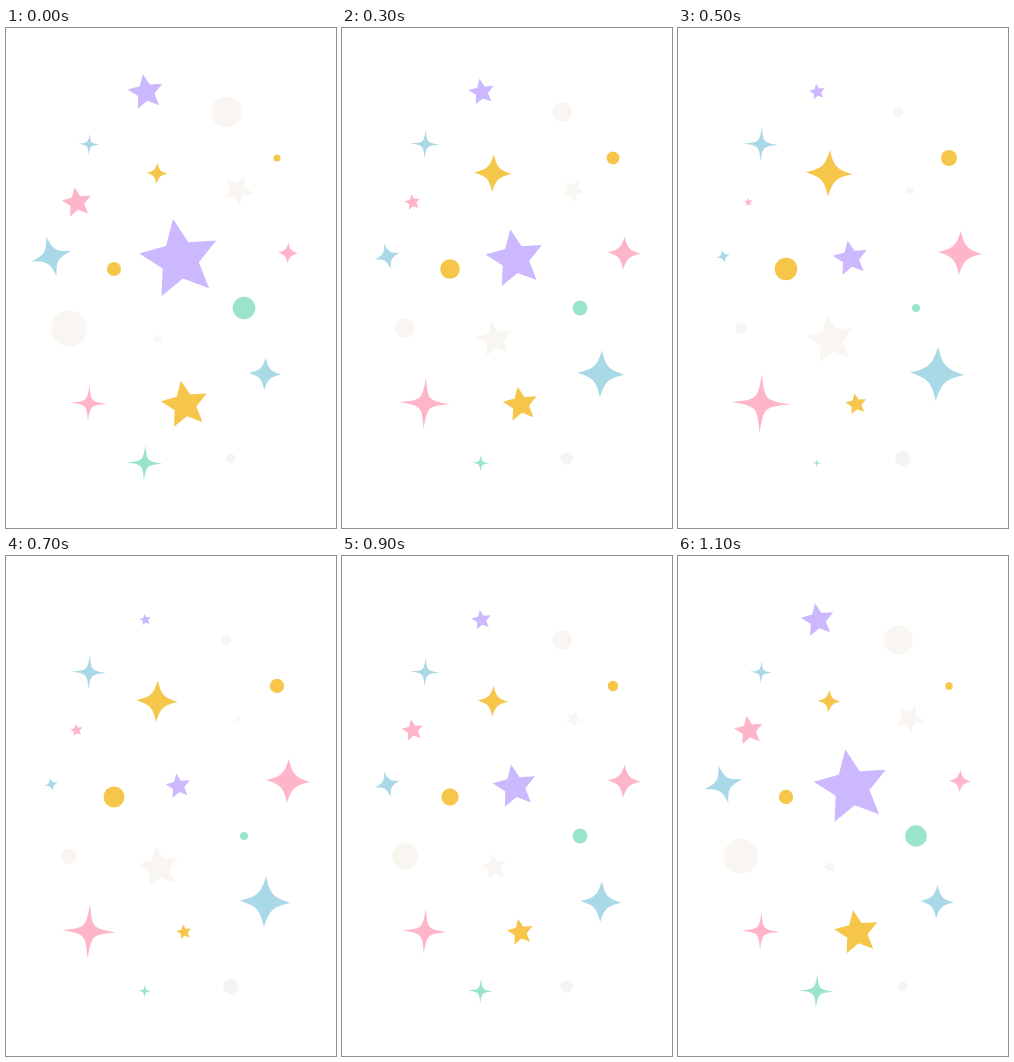
Write an HTML page that moves like this. It is 330x500 px and loops after 1200 ms.

```html
<!DOCTYPE html>
<html lang="en">
<head>
<meta charset="utf-8">
<title>Twinkling stars</title>
<style>
  html, body { margin: 0; width: 100%; height: 100%; overflow: hidden; background: #fff; }
  svg { display: block; width: 100%; height: 100%; }
</style>
</head>
<body>
<svg id="stage" viewBox="0 0 330 500"></svg>
<script>
const LOOP = 1200, STEP = 100;
const PURPLE = '#cbb8fe', PINK = '#ffb5c8', BLUE = '#a9d9e7',
      YELLOW = '#f5c64a', GREEN = '#9ae4ca', CREAM = '#f9f5f0', GREY = '#f5f4f3';

const polar = (deg, r) => {
  const a = deg * Math.PI / 180;
  return [r * Math.sin(a), -r * Math.cos(a)];
};

// Five-point star, centred on its bounding box and one unit wide.
function star(turn) {
  const points = Array.from({ length: 10 }, (_, i) => polar(turn + i * 36, i % 2 ? 0.47 : 1));
  const xs = points.map(p => p[0]), ys = points.map(p => p[1]);
  const left = Math.min(...xs), right = Math.max(...xs);
  const cx = (left + right) / 2, cy = (Math.min(...ys) + Math.max(...ys)) / 2;
  const width = right - left;
  return 'M' + points.map(([x, y]) => [(x - cx) / width, (y - cy) / width]).join('L') + 'Z';
}

// Four-point sparkle one unit wide; (near, far) shape the curve between two tips.
function sparkle(turn, near, far) {
  const r = 0.5 / Math.cos(turn * Math.PI / 180);
  const angle = Math.atan2(near, far) * 180 / Math.PI;
  const bend = r * Math.hypot(near, far);
  let d = 'M' + polar(turn, r);
  for (let q = turn; q < turn + 360; q += 90) {
    d += 'C' + [polar(q + angle, bend), polar(q + 90 - angle, bend), polar(q + 90, r)].join(' ');
  }
  return d + 'Z';
}

const DOT = 'M-.5 0A.5 .5 0 1 1 .5 0A.5 .5 0 1 1 -.5 0Z';
const STAR = star(-9.5), TILTED_STAR = star(28);
const SLIM = sparkle(2.5, 0.12, 0.12), PLUMP = sparkle(2.5, 0.19, 0.31),
      TILTED_SPARKLE = sparkle(-15, 0.17, 0.27);

// shape, colour, centre x, centre y, width at loop start, width at turning point, turning time
const items = [
  [STAR, PURPLE, 171.7, 229.6, 77, 24, 700],
  [STAR, PURPLE, 139, 63.5, 34.5, 11, 700],
  [STAR, YELLOW, 177.7, 375.7, 46, 14.5, 700],
  [TILTED_STAR, CREAM, 232, 163.2, 30, 7.5, 700],
  [STAR, PINK, 70.2, 174, 29, 8, 500],
  [STAR, CREAM, 151.7, 310.6, 11, 47, 500],
  [SLIM, GREEN, 138.7, 435, 35, 9, 500],
  [SLIM, PINK, 82.8, 375.2, 35.5, 59, 500],
  [SLIM, BLUE, 83.2, 116.2, 21.5, 35, 600],
  [PLUMP, YELLOW, 151, 145.2, 21, 46.5, 500],
  [PLUMP, PINK, 282, 225, 20.5, 45.5, 600],
  [PLUMP, BLUE, 259, 345.8, 32.5, 54.5, 500],
  [TILTED_SPARKLE, BLUE, 45.4, 228.2, 39.5, 11.3, 600],
  [DOT, YELLOW, 108, 241, 14, 22.5, 500],
  [DOT, YELLOW, 271, 130, 7, 16, 500],
  [DOT, GREEN, 238, 280, 22.6, 7, 600],
  [DOT, CREAM, 220.3, 84, 30.5, 9, 600],
  [DOT, CREAM, 63, 300.3, 36, 11, 500],
  [DOT, GREY, 224.7, 430.5, 9.3, 15.5, 600]
].map(([d, fill, x, y, from, to, turnAt]) => {
  const node = document.createElementNS('http://www.w3.org/2000/svg', 'path');
  node.setAttribute('d', d);
  node.setAttribute('fill', fill);
  stage.appendChild(node);
  return { node, x, y, from, to, turnAt };
});

const ease = p => (1 - Math.cos(Math.PI * p)) / 2;

function draw(time) {
  const t = Math.floor((time % LOOP) / STEP) * STEP;
  for (const { node, x, y, from, to, turnAt } of items) {
    const progress = t < turnAt ? t / turnAt : (LOOP - t) / (LOOP - turnAt);
    const size = from + (to - from) * ease(progress);
    node.setAttribute('transform', `translate(${x} ${y}) scale(${size})`);
  }
}

const start = performance.now();
function tick() {
  draw(performance.now() - start);
  requestAnimationFrame(tick);
}
tick();
</script>
</body>
</html>
```
